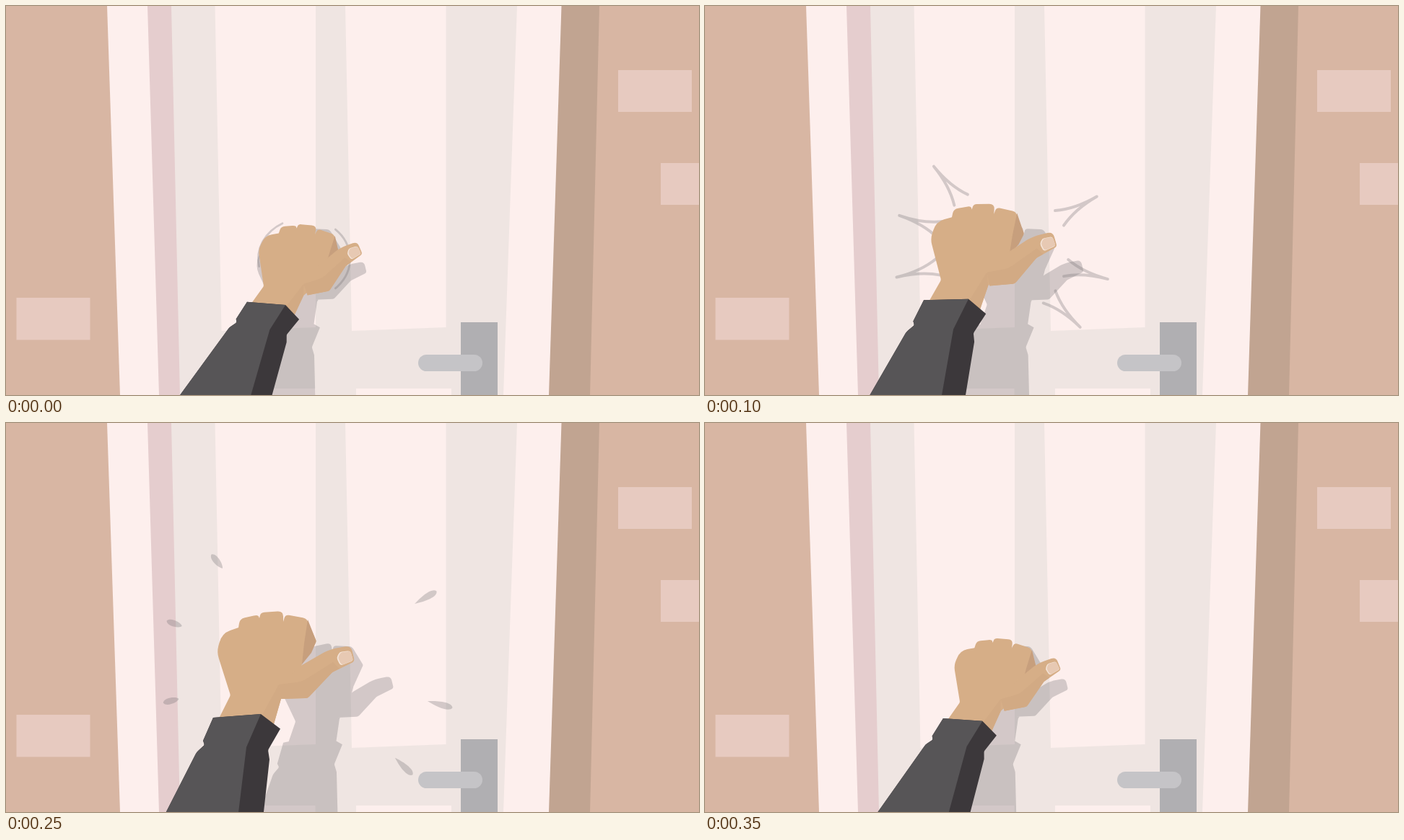
An HTML page with a canvas that plays this animation: 960 px wide and 540 px high, repeating every 0.4 s.

```html
<!DOCTYPE html>
<html lang="en">
<head>
<meta charset="utf-8">
<title>Knocking on a door</title>
<style>
html, body { margin: 0; width: 100%; height: 100%; overflow: hidden; background: #d8b6a3; }
canvas { display: block; width: 960px; height: 540px; }
</style>
</head>
<body>
<canvas id="stage" width="960" height="540"></canvas>
<script>
const ctx = document.getElementById('stage').getContext('2d');
const LOOP = 400, STEP = 50;
const SHADOW = 'rgba(113,109,113,0.3)';
const SKIN = '#d6ae87', SKIN_SHADE = '#d2aa84', SKIN_DARK = '#c79f7d';

const mix = (a, b, k) => a + (b - a) * k;

function toward([ax, ay], [bx, by], d) {
  const k = Math.min(d / Math.hypot(bx - ax, by - ay), 0.5);
  return [mix(ax, bx, k), mix(ay, by, k)];
}

// Closed outline through points [x, y, rounding].
function outline(...pts) {
  const path = new Path2D();
  pts.forEach((c, i) => {
    const r = c[2] || 0;
    path.lineTo(...toward(c, pts.at(i - 1), r));
    path.quadraticCurveTo(c[0], c[1], ...toward(c, pts[(i + 1) % pts.length], r));
  });
  path.closePath();
  return path;
}

// The arm as it looks when drawn back; every other pose is a turn of it.
const FIST = outline(
  [291, 418], [311, 378, 2], [292, 318, 9], [299, 292, 15], [322, 284],
  [324, 272, 7], [349, 266, 6], [351, 271], [353, 263, 5], [384, 261, 8],
  [384, 276], [387, 266, 5], [416, 271, 5], [430, 303, 2], [410, 335],
  [400, 360], [381, 383], [367, 432]);
const WRIST = outline([378, 363], [381, 383], [367, 432], [355, 405]);
const FACET = outline([418, 273], [430, 303, 2], [423, 319], [410, 335], [413, 306]);
const THUMB = outline(
  [378, 363], [410, 336], [443, 317, 4], [455, 313, 4], [478, 309, 8],
  [483, 331, 4], [452, 346, 2], [418, 382, 3], [381, 383]);
const THUMB_SHADE = outline(
  [378, 363], [410, 359, 6], [453, 332], [462, 341],
  [452, 346, 2], [418, 382, 3], [381, 383]);
const NAIL = outline([458, 326, 3], [462, 318, 3], [477, 316, 4], [481, 330, 3], [463, 337, 4]);
const SLEEVE = outline(
  [287, 409], [353, 404], [380, 424.5], [363, 454, 2], [365, 467], [346, 640],
  [171, 640], [264, 457, 3], [275, 447, 2], [273, 441]);
const SLEEVE_FRONT = outline(
  [287, 409], [353, 404], [333, 450], [310, 640],
  [171, 640], [264, 457, 3], [275, 447, 2], [273, 441]);

const move = (x, y) => new DOMMatrix().translate(x, y);
const turn = (x, y, angle, scale) => move(x, y).rotate(angle).scale(scale).translate(-x, -y);
const bendThumb = (angle, scale) => turn(378, 363, angle, scale);

// 0 touches the door, 1 is drawn back: steady out, hold, exponential return.
function pull(step) {
  if (step <= 5) return Math.min(1, step / 3);
  const end = Math.exp(-3);
  return (Math.exp(5 - step) - end) / (1 - end);
}

function fill(color, matrix, ...paths) {
  const all = new Path2D();
  paths.forEach(path => all.addPath(path, matrix));
  ctx.fillStyle = color;
  ctx.fill(all);
}

function drawShadow(p) {
  const arm = move(86 - 31 * (1 - p), 22).multiply(turn(379, 424, -7.7, 0.868));
  const thumb = new Path2D();
  thumb.addPath(THUMB, bendThumb(7, mix(0.81, 0.88, p)));
  fill(SHADOW, arm, FIST, SLEEVE, thumb);
}

function drawArm(p) {
  const arm = turn(449, 519, 9.1 * (1 - p), mix(0.807, 1, p));
  const thumb = arm.multiply(bendThumb(-19 * (1 - p), mix(1.03, 1, p)));
  fill(SKIN, arm, FIST);
  fill(SKIN_SHADE, arm, WRIST);
  fill(SKIN_DARK, arm, FACET);
  fill(SKIN, thumb, THUMB);
  fill(SKIN_SHADE, thumb, THUMB_SHADE);
  fill('#f4e4d8', thumb, NAIL);
  fill('#e7c9b3', thumb.multiply(turn(481, 324, 0, 0.92)), NAIL);
  fill('#3c383b', arm, SLEEVE);
  fill('#575557', arm, SLEEVE_FRONT);
}

// Knock lines fly out from the fist along these angles.
const ANGLES = [-129, -30, 15, 44.5, 166, 199].map(a => a * Math.PI / 180);
const polar = (a, r) => [412 + r * Math.cos(a), 340 + r * Math.sin(a)];
const reach = (a, r) => polar(a, r + 7 * Math.cos(a));

function drawRing() {
  const arc = (from, to) => {
    ctx.beginPath();
    ctx.ellipse(413, 351, 63.5, 56, 0, from, to);
    ctx.stroke();
  };
  ctx.lineWidth = 2.8;
  arc(2.95, 4.22);
  arc(-0.82, 0.82);
}

// The ring stretched into a star.
function drawStar() {
  ctx.lineWidth = 3.5;
  ctx.beginPath();
  ANGLES.forEach((a, i) => {
    const before = i ? ANGLES[i - 1] : ANGLES.at(-1) - 2 * Math.PI;
    ctx.quadraticCurveTo(...polar((a + before) / 2, 65), ...polar(a, 110));
  });
  ctx.quadraticCurveTo(...polar((ANGLES[0] + ANGLES.at(-1)) / 2 + Math.PI, 65),
    ...polar(ANGLES[0], 110));
  ctx.stroke();
}

// The star torn apart between its tips.
function drawForks() {
  ctx.lineWidth = 4;
  for (const a of ANGLES) {
    ctx.beginPath();
    ctx.moveTo(...polar(a - 0.13, 92));
    ctx.quadraticCurveTo(...polar(a, 116), ...polar(a, 151));
    ctx.quadraticCurveTo(...polar(a, 116), ...polar(a + 0.13, 92));
    ctx.stroke();
  }
}

// Leaves that shrink towards their outer ends; k runs from 0 to 1.
function drawLeaves(k) {
  const inner = mix(120, 178, k), outer = mix(187, 207, k);
  const root = mix(4, 4.2, k), head = mix(4.2, 7.5, k);
  for (const a of ANGLES) {
    const side = s => [
      ...reach(a + s * root / inner, mix(inner, outer, 0.3)),
      ...reach(a + s * head / outer, mix(inner, outer, 0.9))];
    const [x1, y1, x2, y2] = side(1);
    ctx.beginPath();
    ctx.moveTo(...polar(a, inner));
    ctx.bezierCurveTo(...side(-1), ...reach(a, outer));
    ctx.bezierCurveTo(x2, y2, x1, y1, ...polar(a, inner));
    ctx.fill();
  }
}

function drawDots() {
  for (const a of ANGLES) {
    ctx.beginPath();
    ctx.arc(...reach(a, 209), 2.5, 0, 2 * Math.PI);
    ctx.fill();
  }
}

function drawKnock(step) {
  ctx.fillStyle = ctx.strokeStyle = SHADOW;
  ctx.lineCap = ctx.lineJoin = 'round';
  if (step === 0) drawRing();
  else if (step === 1) drawStar();
  else if (step === 2) drawForks();
  else if (step <= 5) drawLeaves((step - 3) / 2);
  else if (step === 6) drawDots();
}

function box(color, x, y, w, h) {
  ctx.fillStyle = color;
  ctx.fillRect(x, y, w, h);
}

// A board between two slanted edges, given by their x at top and bottom.
function board(color, left, right, leftEnd, rightEnd, bottom = 540, rightBottom = bottom) {
  ctx.fillStyle = color;
  ctx.fill(outline([left, 0], [right, 0], [rightEnd, rightBottom], [leftEnd, bottom]));
}

function drawDoor() {
  const light = '#fdefed', brick = '#e7cac0';
  box('#d8b6a3', 0, 0, 960, 540);
  box(brick, 848, 89, 102, 58);
  box(brick, 907, 218, 53, 58);
  box(brick, 14.5, 405, 102, 58.5);
  board('#c1a491', 760, 822, 745, 809);
  board(light, 140, 769.5, 158, 752);
  board('#e5cdce', 196, 235, 212, 247);
  board('#efe5e2', 229, 708, 241, 689);
  board(light, 289.5, 429, 298.5, 429, 451, 446);
  board(light, 470, 609.5, 479, 609.5, 451, 446);
  box(light, 302, 531, 126.5, 9);
  box(light, 485, 531, 132, 9);
  box('#b0afb2', 630, 439, 51, 101);
  ctx.fillStyle = '#c5c4c7';
  ctx.beginPath();
  ctx.roundRect(571, 484, 89, 23, 11.5);
  ctx.fill();
}

function draw(time) {
  const step = Math.floor((time % LOOP) / STEP);
  const p = pull(step);
  drawDoor();
  drawShadow(p);
  drawKnock(step);
  drawArm(p);
}

let start;
function tick(now) {
  start ??= now;
  draw(now - start);
  requestAnimationFrame(tick);
}
draw(0);
requestAnimationFrame(tick);
</script>
</body>
</html>
```
